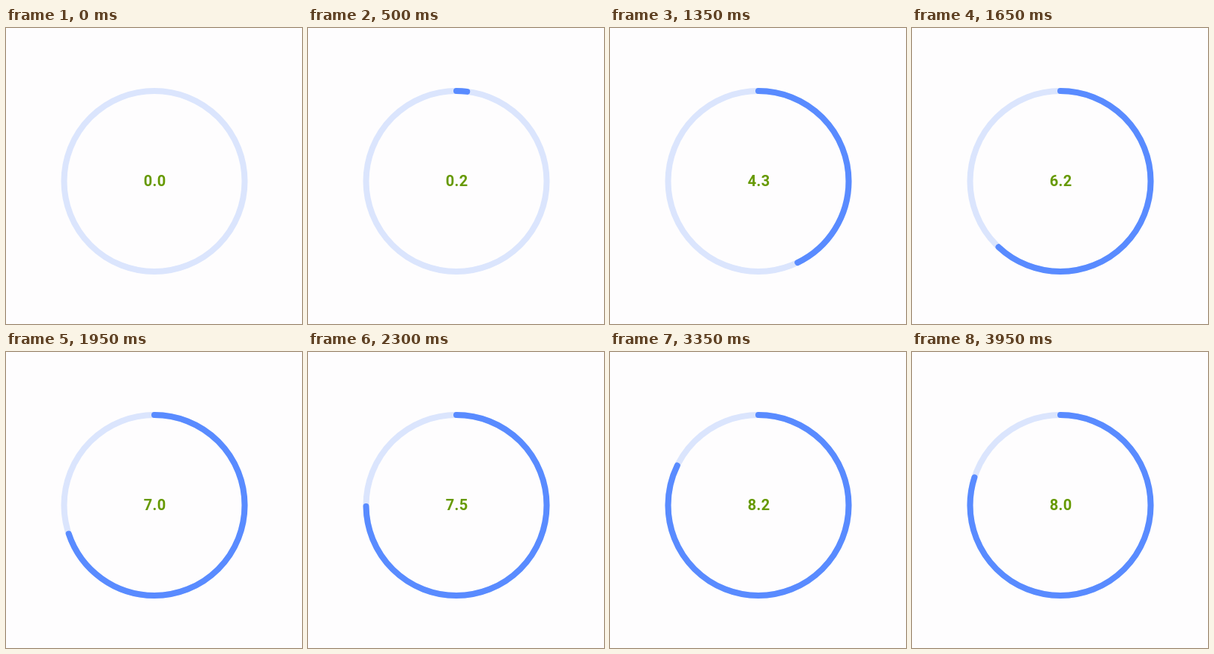
An HTML page that plays this animation: 395x395 px, repeating every 4000 ms.

```html
<!DOCTYPE html>
<html lang="en">
<head>
<meta charset="utf-8">
<title>Progress ring</title>
<style>
  html, body { margin: 0; width: 100%; height: 100%; overflow: hidden; background: #fefdfe; }
  svg { display: block; width: 100%; height: 100%; }
  circle { fill: none; stroke-width: 8; }
  .track { stroke: #dbe5fd; }
  .arc { stroke: #598bff; stroke-linecap: round; }
  text { font: 700 20px Roboto, sans-serif; letter-spacing: .3px; fill: #669900; text-anchor: middle; }
</style>
</head>
<body>
<svg viewBox="0 0 395 395">
  <circle class="track" cx="198" cy="204.5" r="120.5"/>
  <circle class="arc" cx="198" cy="204.5" r="120.5" pathLength="10" transform="rotate(-90 198 204.5)"/>
  <text x="198.6" y="211">0.0</text>
</svg>
<script>
const LOOP = 4000, STEP = 50;
const arc = document.querySelector('.arc');
const label = document.querySelector('text');

// time in s, value, speed per s
const keys = [
  [0.3, 0, 0], [0.5, 0.19, 1.9], [1, 1.79, 4.8], [1.65, 6.2, 3.7],
  [2.3, 7.48, 1.35], [2.9, 8.23, 0.5], [3.15, 8.29, 0], [3.8, 8, 0]
];

function valueAt(t) {
  if (t <= keys[0][0]) return 0;
  const i = keys.findIndex(k => k[0] > t);
  if (i < 0) return keys[keys.length - 1][1];
  const [t0, v0, s0] = keys[i - 1], [t1, v1, s1] = keys[i];
  const d = t1 - t0, u = (t - t0) / d, w = 1 - u;
  return w * w * ((1 + 2 * u) * v0 + u * d * s0) + u * u * ((3 - 2 * u) * v1 - w * d * s1);
}

function render(ms) {
  const held = Math.floor(ms % LOOP / STEP) * STEP;
  const v = held < 350 ? 0 : valueAt(held / 1000);
  arc.style.visibility = v > 0 ? 'visible' : 'hidden';
  arc.setAttribute('stroke-dasharray', v.toFixed(4) + ' 20');
  label.textContent = v.toFixed(1);
}

const start = performance.now();
function tick() {
  render(performance.now() - start);
  requestAnimationFrame(tick);
}
tick();
</script>
</body>
</html>
```
